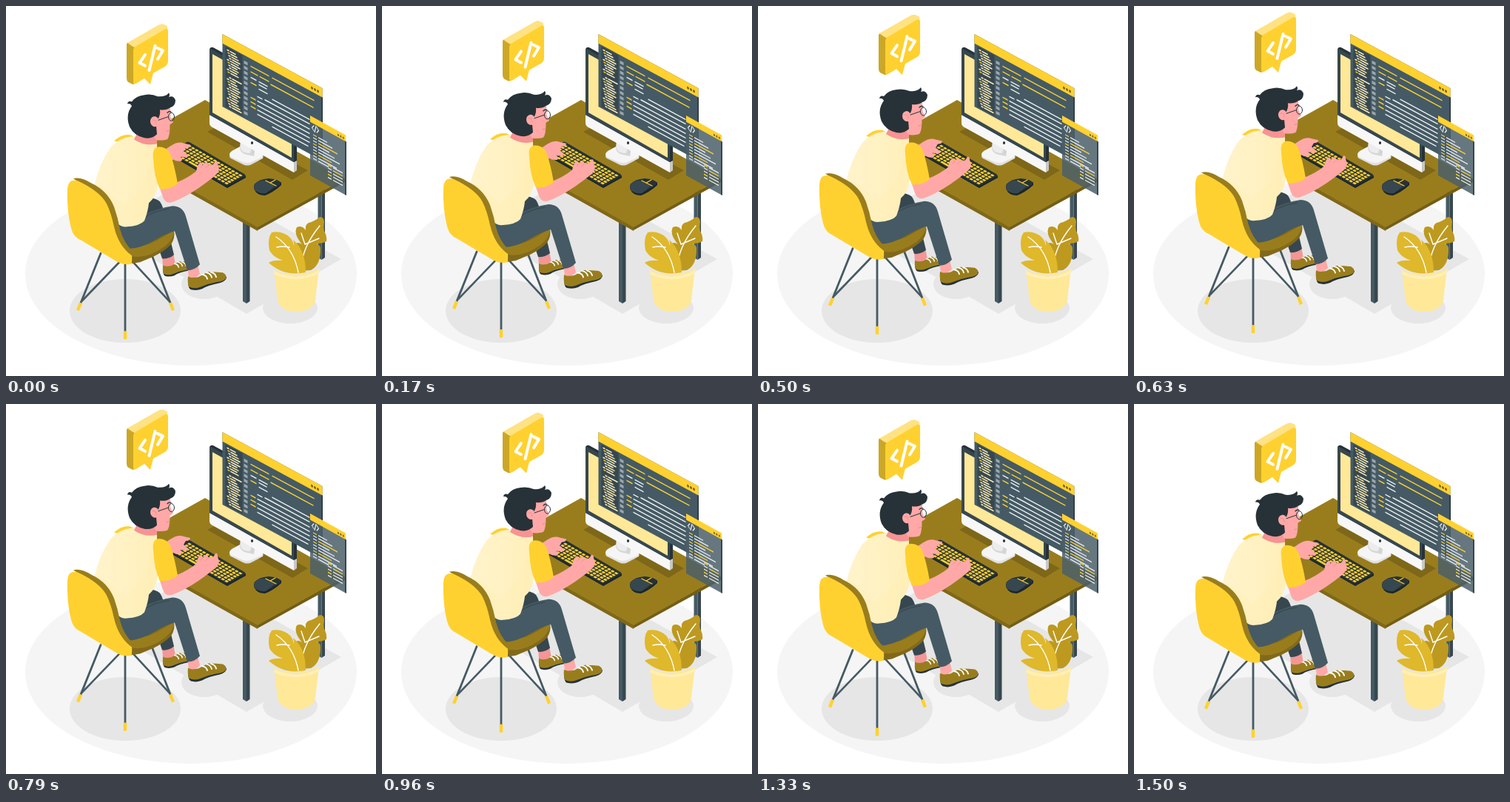
These frames come from a looping animation (500 by 500 pixels, 1.54 s). An HTML page with a canvas:

```html
<!DOCTYPE html>
<html lang="en">
<head>
<meta charset="utf-8">
<title>Programmer at a desk</title>
<style>
html, body { margin: 0; width: 100%; height: 100%; overflow: hidden; background: #fff; }
canvas { display: block; width: 100vw; height: 100vh; }
</style>
</head>
<body>
<canvas id="stage" width="500" height="500"></canvas>
<script>
const ctx = document.getElementById('stage').getContext('2d');
const LOOP = 1540, HALF = LOOP / 2, LEAD = 40;
const YELLOW = '#ffd130', PALE = '#ffe897', CREAM = '#fff1c1', OLIVE = '#997d1d', BROWN = '#735e16';
const SLATE = '#455a64', DEEP = '#37474f', INK = '#263238', SKIN = '#ffa8a7', SHADE = '#e6e6e6', WHITE = '#fff';

function fill(color, d) {
  ctx.fillStyle = color;
  ctx.fill(new Path2D(d));
}

function line(color, width, d, cap = 'round') {
  ctx.strokeStyle = color;
  ctx.lineWidth = width;
  ctx.lineCap = cap;
  ctx.lineJoin = 'round';
  ctx.stroke(new Path2D(d));
}

function oval(color, x, y, rx, ry, turn = 0) {
  ctx.fillStyle = color;
  ctx.beginPath();
  ctx.ellipse(x, y, rx, ry, turn, 0, Math.PI * 2);
  ctx.fill();
}

function rect(color, x, y, w, h) {
  ctx.fillStyle = color;
  ctx.fillRect(x, y, w, h);
}

function placed(draw, ...matrix) {
  ctx.save();
  ctx.transform(...matrix);
  draw();
  ctx.restore();
}

function floor() {
  oval('#f5f5f5', 250, 362, 224, 124);
  fill(SHADE, 'M127 300L255 232L453 342L325 416Z');
  oval(SHADE, 161, 412, 75, 43);
  oval(SHADE, 268, 376, 31, 20);
  oval(SHADE, 384, 408, 37, 21);
}

function deskLeg(x, top, bottom) {
  fill(SLATE, `M${x} ${top}h5V${bottom}l-5 -3Z`);
  fill(DEEP, `M${x + 5} ${top}h4.5V${bottom - 3}l-4.5 3Z`);
}

function desk() {
  deskLeg(421.5, 240, 343);
  deskLeg(320, 285, 402);
  fill(BROWN, 'M151 193L340 298L458 233V238L340 303L151 198Z');
  fill('#806818', 'M151 193L340 299V304L151 198Z');
  fill(OLIVE, 'M269 127L458 233L340 299L151 193Z');
  fill('#7e6718', 'M272 170L291 160L408 222L387 235Z');
}

function monitor() {
  fill('#e0e0e0', 'M302 202Q302 197 309 194L320 188L345 199Q349 202 347 206L332 214Q326 217 320 214L304 206Q302 205 302 202Z');
  fill('#f5f5f5', 'M302 201Q302 197 309 194L320 188L345 199Q349 202 345 205L331 211Q326 213 320 211L304 204Z');
  fill('#d5d5d5', 'M317 180L337 190L335 203L322 200Q315 196 316 190Z');
  fill('#ececec', 'M317 180L333 188L330 199Q315 199 317 188Z');
  fill('#c7c7c7', 'M388 205L393 203V222L389 225Z');
  fill('#f7f7f7', 'M275 145L389 207V225L279 164Q275 162 275 158Z');
  fill(INK, 'M275 60Q275 55 280 56L393 118V209L389 211L275 147Z');
  fill(DEEP, 'M275 60Q276 57 279 59L389 121V211L275 147Z');
  fill(PALE, 'M279 65L386 124V205L279 144Z');
  oval(INK, 332.5, 185, 1.6, 2);
}

// x, y, width, and whether the line is white
const CODE = [
  [38, 22, 25, 0], [67, 22, 57, 0], [38, 29.5, 10, 0], [50, 29.5, 13, 0], [65, 32, 58, 0],
  [38, 37, 8, 1], [49, 37, 12, 1], [38, 44, 8, 0], [49, 41, 11, 1], [49, 47, 12, 1],
  [57, 57, 61, 1], [67, 51, 51, 1], [47, 58, 7, 1], [38, 64, 7, 0], [47, 64, 71, 1],
  [38, 70, 7, 0], [47, 70, 71, 1], [38, 76, 7, 0], [47, 76, 71, 1], [47, 82, 71, 1], [67, 88, 49, 1]
];

function bigWindow() {
  rect(SLATE, 0, 0, 135, 98);
  rect(DEEP, 4, 14, 23, 82);
  rect(YELLOW, 0, 0, 135, 12.5);
  rect(INK, 134, 12.5, 1.5, 85.5);
  for (let i = 0; i < 3; i++) oval(BROWN, 121 + i * 4, 7.5, 1.4, 1.8);
  for (let i = 0; i < 24; i++) {
    if (i === 10) continue;
    const y = 17 + i * 3.25, x = 6 + i * 5 % 4;
    rect(i % 4 === 1 ? YELLOW : CREAM, x, y, 3, 1.7);
    rect(i % 5 === 2 ? PALE : CREAM, x + 4, y, 8 + i * 7 % 6, 1.7);
  }
  for (let i = 0; i < 11; i++) rect('#9aa6ac', 29, 20 + i * 6.8, 5, 4);
  for (const [x, y, w, white] of CODE) rect(white ? '#f1f4f5' : YELLOW, x, y, w, 1.6);
}

function smallWindow() {
  ctx.globalAlpha = .85;
  rect('#4c6069', 0, 8, 48, 73);
  ctx.globalAlpha = 1;
  rect(YELLOW, 0, 0, 48, 8.5);
  rect(DEEP, 47, 8.5, 2, 72.5);
  for (let i = 0; i < 3; i++) oval(BROWN, 38 + i * 3.4, 5.5, 1, 1.5);
  line(WHITE, 1, 'M5 11L2.5 15L5 18M8 10L6 19M9 11L11.5 14L9 18');
  for (let i = 0; i < 14; i++) {
    const left = i < 9, x = left ? 4 : 24, y = left ? 23 + i * 4 : 36 + (i - 5) * 4.2;
    rect(i % 3 ? '#edf0f1' : YELLOW, x, y, 5, 1.4);
    rect(i % 4 === 2 ? YELLOW : '#edf0f1', x + 7, y, left ? 12 + i * 7 % 18 : 13, 1.4);
  }
}

function keyboard() {
  fill('#1c262a', 'M226 199L299 242L324 229V232L299 246L226 204Z');
  fill(INK, 'M248 184L322 227Q325 229 322 231L301 242Q298 244 295 242L226 202Q223 200 226 198L244 184Q246 183 248 184Z');
  placed(() => {
    for (let row = 0; row < 6; row++) {
      for (let col = 0; col < 15; col++) {
        if (row === 5 && col > 3 && col < 9) continue;
        rect(YELLOW, 3 + col * 4.9, 1.5 + row * 3.7, 3.5, 2.6);
      }
      if (row === 5) rect(YELLOW, 22.6, 20, 23, 2.6);
    }
  }, 1, .575, -1, .58, 246, 185);
}

function mouse() {
  fill('#1c262a', 'M335 245Q337 256 350 256Q361 252 372 242V238L336 240Z');
  fill(INK, 'M336 241Q341 234 355 233Q368 234 372 239Q370 243 351 253Q340 254 335 247Z');
  fill(DEEP, 'M336 241Q341 235 351 236L364 243L351 253Q340 254 335 247Z');
  line(YELLOW, 1.2, 'M351 236L365 243M357 239L364 235');
}

function plant() {
  fill('#bd991f', 'M400 358Q389 330 391 322Q394 318 400 322Q388 308 393 299Q400 296 405 303Q404 295 409 293Q417 291 424 285Q430 285 430 292Q429 299 430 304Q434 311 433 318Q428 321 420 321Q426 324 425 330Q425 350 412 357Z');
  line(WHITE, 1.4, 'M399 352Q401 325 424 297M404 322L399 307M404 322L423 314');
  fill('#dfb82b', 'M398 361Q374 364 355 347Q361 343 374 344Q360 339 356 330Q353 314 359 306Q373 303 384 313Q389 319 389 326Q390 321 388 316Q405 330 405 360Z');
  line(WHITE, 1.4, 'M365 312Q389 328 395 360M383 326Q373 324 366 326');
  fill(PALE, 'M362 357Q392 370 423 355L418 397Q415 412 392 413Q370 412 367 397Z');
  fill('#fff0b8', 'M362 357Q366 363 392 366Q419 363 423 355L422 362Q393 376 363 363Z');
}

function chairLegs() {
  const legs = [[128, 334, 97, 411], [161, 345, 161, 450], [198, 339, 226, 411]];
  line(SLATE, 2.6, 'M155 344L103 398M172 346L221 399');
  for (const [x1, y1, x2, y2] of legs) {
    const k = 11 / Math.hypot(x2 - x1, y2 - y1);
    const x = x2 - (x2 - x1) * k, y = y2 - (y2 - y1) * k;
    line(SLATE, 2.8, `M${x1} ${y1}L${x} ${y}`);
    line(YELLOW, 4.4, `M${x} ${y}L${x2} ${y2}`, 'butt');
  }
}

function shoe(x, y, scale) {
  placed(() => {
    fill(INK, 'M0 12Q0 23 4 24Q12 26 19 23Q27 18 43 15Q52 12 52 7L49 4Z');
    fill(OLIVE, 'M0 6Q3 9 14 7L27 0Q38 0 47 1Q53 4 51 9Q48 13 38 14Q27 16 18 20Q9 24 1 20Q-1 14 0 6Z');
    line(WHITE, 1.9, 'M19 3.5Q25 4.5 26 9.5M25 1Q31 2.5 32 7.5M31 .5Q37 2 38 7');
  }, scale, 0, 0, scale, x, y);
}

function legsAndSeat() {
  fill('#f39696', 'M211 336L226 333L229 349Q222 356 212 352Z');
  shoe(212, 345, .82);
  fill(DEEP, 'M183 264Q197 255 208 264Q213 271 216 290L227 336Q220 342 211 341L194 291Z');
  fill(SKIN, 'M245 352L259 349L262 362Q254 370 247 366Z');
  shoe(246, 359, 1);
  fill('#82691a', 'M158 323L227 303Q229 313 223 322Q214 331 200 338L181 346L168 348Z');
  fill(OLIVE, 'M155 322Q181 329 203 317Q219 308 227 303Q227 315 214 325Q190 342 170 338Z');
  fill(SLATE, 'M148 294Q165 291 182 284Q207 272 225 270Q239 270 243 284L262 349Q255 357 245 357L228 304Q214 308 203 315Q180 329 162 328Z');
  line(DEEP, 1.2, 'M188 285Q202 276 220 274');
}

function torso() {
  fill(YELLOW, 'M146 182Q157 172 168 174L176 178L160 186Z');
  const shirt = ctx.createLinearGradient(120, 230, 204, 230);
  shirt.addColorStop(0, '#fff3cb');
  shirt.addColorStop(.6, CREAM);
  shirt.addColorStop(1, '#ffefb9');
  fill(shirt, 'M174 176Q155 176 141 191Q126 213 119 243Q127 252 133 264Q142 279 149 292Q155 299 163 298Q181 297 187 290Q192 277 193 266Q204 257 205 239L204 185Q190 188 174 176Z');
  fill('rgba(255,235,170,.25)', 'M119 243Q139 242 158 270Q185 253 197 210L199 247L192 270Q188 297 163 298Q154 297 149 292L133 264Z');
}

function chairBack() {
  fill(OLIVE, 'M91 233Q101 230 115 239Q137 249 146 271Q151 285 154 301Q159 320 171 331L171 344L156 340L120 251Z');
  fill(YELLOW, 'M83 247Q84 232 97 236Q127 250 136 267Q142 279 146 298Q152 324 170 337V348Q159 351 148 344L101 316Q91 312 88 300Q82 277 83 247Z');
}

function head() {
  fill('#f79393', 'M178 170L204 171V186Q188 190 173 180Z');
  fill(SKIN, 'M204 141L222 137L222.5 150Q225 154 226 157L221.5 160Q221.5 176 218 180Q212 182 203 181L195 168Z');
  fill(INK, 'M164 132Q165 127 170 129Q176 121 187 120Q196 118 205 122Q216 123 220 117Q222 120 220 123Q226 120 229 127Q229 135 222 137Q216 141 208 140Q209 147 205 153L203 162L204 173Q197 180 187 178Q173 175 167 163Q161 147 170 135Q168 131 164 132Z');
  oval(SKIN, 201, 156, 6, 7, -.2);
  line('#f28f8f', 1, 'M198 154Q203 152 203 159');
  line(INK, 1, 'M206 154L219 149.5');
  ctx.beginPath();
  ctx.ellipse(223.5, 149.5, 4, 5.5, 0, 0, Math.PI * 2);
  ctx.stroke();
  line(INK, 1.3, 'M218 144Q221 141 223 143');
  line('#e58b8b', 1, 'M217 169L221 168');
}

function farHand() {
  fill(SKIN, 'M205 202Q218 190 229 185Q236 183 240 185L249 187Q249 191 243 191L240 196L246 201Q247 204 243 204L235 203Q240 206 237 209Q231 210 226 207L211 215Z');
}

function nearArm() {
  fill(SKIN, 'M207 243L231 238Q246 232 257 223Q259 213 263 211Q266 211 265 215L270 211Q273 210 273 214L280 214L283 209Q286 208 286 213L288 220Q287 226 279 232Q270 239 260 246Q239 260 224 265Q215 267 212 258Z');
  line('#f08f8f', .8, 'M263 218L267 214M269 219L275 214');
}

function sleeve() {
  fill(YELLOW, 'M199 205Q197 192 206 190Q217 190 222 199Q228 216 232 240Q222 248 208 247Q200 231 199 205Z');
}

function bubble() {
  fill('#cca726', 'M163 53Q163 49 167 50L174 55V105Q172 107 169 105L165 103Q163 101 163 98ZM184 94L195 106V98Z');
  fill('#ffe283', 'M164 50L206 26Q210 24 213 25L217 27Q219 28 218 31L175 57Q169 54 164 50Z');
  fill(YELLOW, 'M172 60Q172 57 175 55L214 32Q219 29 219 34V75Q219 79 215 82L199 91L195 106L187 98L176 105Q172 107 172 102Z');
  line(WHITE, 4, 'M188 66L180.5 77L188 81M201.5 54L193.5 87M204.5 57L212 60.5L205 72');
}

function draw(now) {
  // Steady rise and fall, each taking half the loop.
  const up = 1 - Math.abs((now + LEAD) % LOOP - HALF) / HALF;
  const lifted = (distance, part) => placed(part, 1, 0, 0, 1, 0, .8 - distance * up);
  ctx.fillStyle = WHITE;
  ctx.fillRect(0, 0, 500, 500);
  floor();
  desk();
  monitor();
  placed(bigWindow, 1, .54, 0, 1, 292.5, 38);
  placed(smallWindow, 1, .55, 0, 1, 411, 148);
  keyboard();
  mouse();
  plant();
  lifted(7.5, farHand);
  lifted(10, () => {
    chairLegs();
    legsAndSeat();
    torso();
    chairBack();
  });
  lifted(11, head);
  lifted(8.5, nearArm);
  lifted(9.5, sleeve);
  lifted(19.5, bubble);
}

function tick() {
  draw(performance.now());
  requestAnimationFrame(tick);
}
tick();
</script>
</body>
</html>
```
